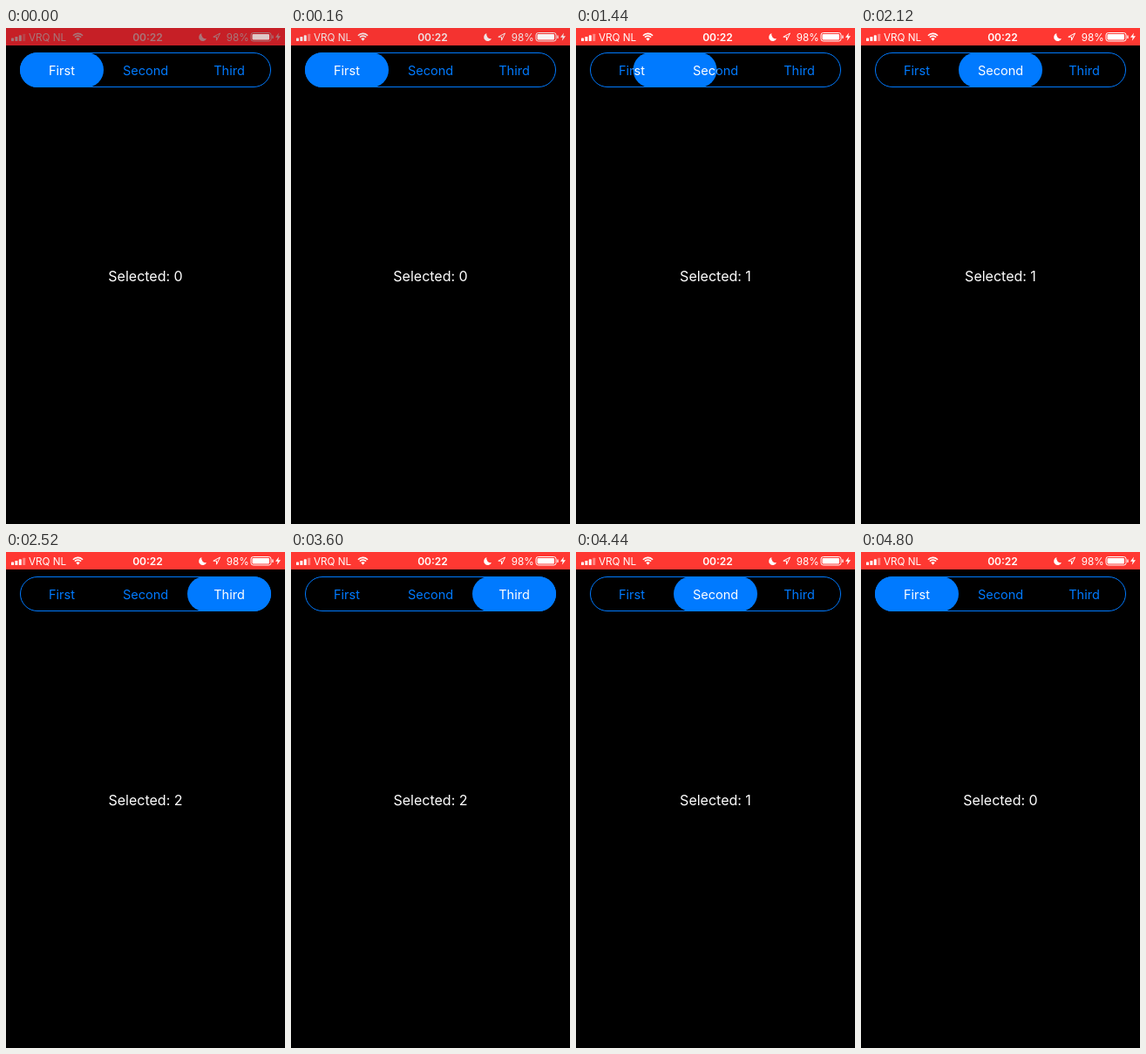
Recreate the animation shown at these times as an HTML page with a canvas. Size 320 by 568 pixels, loop 4.84 s.

```html
<!DOCTYPE html>
<html lang="en">
<head>
<meta charset="utf-8">
<title>Segmented control</title>
<style>
html, body { margin: 0; width: 100%; height: 100%; overflow: hidden; background: #000; }
canvas { display: block; }
</style>
</head>
<body>
<canvas id="stage" width="320" height="568"></canvas>
<script>
const ctx = document.getElementById('stage').getContext('2d');
const LOOP = 4840, STEP = 40, BLUE = '#007aff';
const FONT = 'Inter, Roboto, "Liberation Sans", sans-serif';
const TITLES = ['First', 'Second', 'Third'];
const MOVES = [
  { start: 1280, end: 1595, from: 0, to: 1 },
  { start: 2165, end: 2500, from: 1, to: 2 },
  { start: 3670, end: 3960, from: 2, to: 1 },
  { start: 4480, end: 4795, from: 1, to: 0 }
];

const clamp = v => Math.max(0, Math.min(1, v));
const ease = p => p < .5 ? 2 * p * p : 1 - 2 * (1 - p) ** 2;
const mix = (a, b, k) => `rgb(${a.map((v, i) => Math.round(v + (b[i] - v) * k))})`;

function text(str, x, y, size, color, align = 'center', weight = 400) {
  ctx.font = `${weight} ${size}px ${FONT}`;
  ctx.textAlign = align;
  ctx.fillStyle = color;
  ctx.fillText(str, x, y);
}

function rounded(x, y, w, h, r) {
  ctx.beginPath();
  ctx.roundRect(x, y, w, h, r);
}

function polygon(d, color) {
  ctx.fillStyle = color;
  ctx.fill(new Path2D(d));
}

function statusBar(t) {
  const k = clamp(t / 200);
  const ink = mix([168, 118, 122], [255, 255, 255], k);
  ctx.fillStyle = mix([198, 31, 38], [255, 56, 50], k);
  ctx.fillRect(0, 0, 320, 20);

  // Signal strength
  ctx.fillStyle = ink;
  for (let i = 0; i < 4; i++) {
    const h = 3.5 + i * 1.6;
    ctx.globalAlpha = i < 3 ? 1 : .4;
    rounded(6 + i * 4.4, 15 - h, 3, h, .6);
    ctx.fill();
  }
  ctx.globalAlpha = 1;
  text('VRQ NL', 26, 14.5, 11.7, ink, 'left');

  // Wi-Fi
  ctx.strokeStyle = ink;
  ctx.lineWidth = 1.6;
  for (const r of [4.9, 7.6]) {
    ctx.beginPath();
    ctx.arc(82.5, 14, r, -Math.PI * .76, -Math.PI * .24);
    ctx.stroke();
  }
  polygon('M82.5 14.7L80.3 12.2Q82.5 10.4 84.7 12.2Z', ink);

  text('00:22', 162.5, 14.5, 12, ink, 'center', 600);
  polygon('M224.3 6A4.6 4.6 0 1 0 230 12.2A5 5 0 0 1 224.3 6Z', ink);
  ctx.lineWidth = 1;
  ctx.stroke(new Path2D('M245.5 6L237.8 10.2H241.5V14.2Z'));
  text('98%', 252.8, 14.5, 11.7, ink, 'left');

  // Battery
  rounded(281, 5.5, 23, 9.5, 2.5);
  ctx.stroke();
  ctx.fillStyle = ink;
  ctx.fillRect(305.3, 8.5, 1.3, 3.5);
  ctx.fillStyle = mix([222, 200, 200], [255, 255, 255], k);
  rounded(282.5, 7, 19.5, 6.5, 1);
  ctx.fill();
  polygon('M313 5.5L309 10.7H311.7L310.8 14.7L315 9.3H312.2Z', ink);
}

function titles(color) {
  TITLES.forEach((title, i) => text(title, 64 + 96 * i, 53.5, 14.5, color));
}

function control(position) {
  ctx.strokeStyle = BLUE;
  ctx.lineWidth = 1;
  rounded(16.5, 28.5, 287, 39, 19.5);
  ctx.stroke();
  titles(BLUE);

  // The pill reveals a white copy of the titles.
  ctx.save();
  rounded(16 + 96 * position, 28, 96, 40, 20);
  ctx.fillStyle = BLUE;
  ctx.fill();
  ctx.clip();
  titles('#fff');
  ctx.restore();
}

function draw(t) {
  let position = 0, selected = 0;
  for (const m of MOVES) {
    if (t <= m.start) break;
    position = m.from + (m.to - m.from) * ease(clamp((t - m.start) / (m.end - m.start)));
    selected = m.to;
  }
  ctx.fillStyle = '#000';
  ctx.fillRect(0, 0, 320, 568);
  statusBar(t);
  control(position);
  text('Selected: ' + selected, 160, 290, 16, '#fff');
}

let origin;
function frame(now) {
  origin ??= now;
  draw(Math.floor((now - origin) % LOOP / STEP) * STEP);
  requestAnimationFrame(frame);
}
requestAnimationFrame(frame);
</script>
</body>
</html>
```
